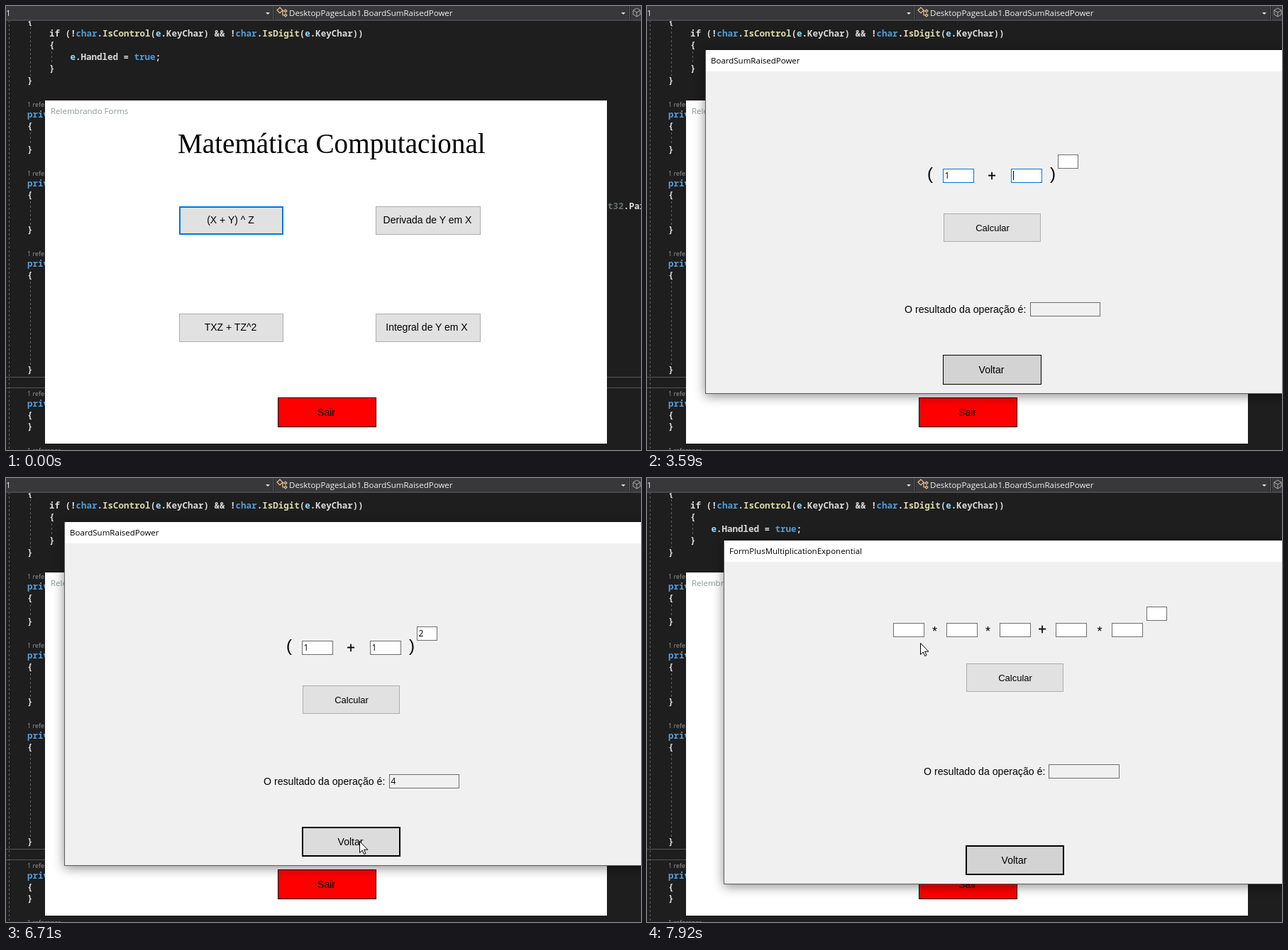
An HTML page that plays this animation: 895 by 625 pixels, repeating every 7990 ms.

```html
<!DOCTYPE html>
<html lang="pt">
<head>
<meta charset="utf-8">
<title>Matemática Computacional</title>
<style>
html, body { margin: 0; width: 100%; height: 100%; overflow: hidden; background: #1e1e1e; }
svg { display: block; width: 895px; height: 625px; }
text { white-space: pre; }
.ui, .value { font-family: "Open Sans", "Noto Sans", sans-serif; font-size: 11.5px; }
.value { font-size: 12px; }
.code { font: 600 12.5px "Noto Sans Mono", "DejaVu Sans Mono", monospace; fill: #dcdcdc; }
.lens { font: 9px "Open Sans", sans-serif; fill: #999; }
.arial { font-family: "Liberation Sans", Arial, sans-serif; }
.head { font: 39.15px "Liberation Serif", "Times New Roman", serif; }
.shadow { filter: drop-shadow(0 3px 8px rgba(0, 0, 0, .45)); }
</style>
</head>
<body>
<svg viewBox="0 0 895 625"><g id="editor"></g><g id="stage"></g></svg>
<script>
const LOOP = 7990;
const $ = id => document.getElementById(id);

// ---------- drawing helpers ----------
const rect = (x, y, w, h, fill, stroke = 'none', sw = 1, cls = '') => {
  const d = stroke === 'none' ? 0 : sw;
  return `<rect x="${x + d / 2}" y="${y + d / 2}" width="${w - d}" height="${h - d}" fill="${fill}" stroke="${stroke}" stroke-width="${sw}" class="${cls}"/>`;
};
const path = (d, fill, stroke = 'none', extra = '') =>
  `<path d="${d}" fill="${fill}" stroke="${stroke}" ${extra}/>`;
const text = (x, y, s, cls = 'ui', fill = '#000') =>
  `<text x="${x}" y="${y}" class="${cls}" fill="${fill}">${s}</text>`;
const arial = (x, y, s, size = 14, extra = 'text-anchor="middle"') =>
  `<text x="${x}" y="${y}" class="arial" font-size="${size}" ${extra}>${s}</text>`;

// ---------- code editor behind the windows ----------
const tint = { char: '#569cd6', true: '#569cd6', private: '#569cd6', e: '#9cdcfe', t32: '#6c706c',
  IsControl: '#dcdcaa', IsDigit: '#dcdcaa' };
const code = (x, y, s) => text(x, y, s.replace(/\w+/g, w =>
  tint[w] ? `<tspan fill="${tint[w]}">${w}</tspan>` : w), 'code', '#dcdcdc');

function editor() {
  let s = rect(0, 0, 895, 625, '#1e1e1e');
  s += code(30, 26, '{') +
    code(61, 43, 'if (!char.IsControl(e.KeyChar) &amp;&amp; !char.IsDigit(e.KeyChar))') +
    code(61, 59, '{') + code(90.5, 76, 'e.Handled = true;') + code(61, 92, '}') +
    code(30, 109, '}') + code(848, 286, 't32.Parse(');
  for (const [y, end] of [[142, 206], [239, 319], [352, 516], [549, 596]])
    s += text(30, y, '1 reference', 'lens') + code(30, y + 14.5, 'private') +
      code(30, y + 30.5, '{') + code(30, end, '}');
  s += text(30, 629, '1 reference', 'lens');
  s += path('M4.5 20V625M34.5 30V98M64.5 64V82M34.5 178V195M34.5 275V308M34.5 388V505',
    'none', '#626262', 'stroke-dasharray="3 3"');
  s += path('M0 522.5H895M0 537.5H895', 'none', '#555');
  s += rect(0, 0, 895, 20, '#38383b') + rect(0, 19, 895, 2, '#48484c');
  for (const x of [375, 877])
    s += rect(x, 0, 3, 20, '#222224') + rect(x + 1, 0, 1, 20, '#6a6a6a');
  s += path('M366 9h6l-3 3zM867 9h6l-3 3z', '#ddd');
  s += text(0, 13.5, '1', 'ui', '#f1f1f1') +
    text(399, 13.5, 'DesktopPagesLab1.BoardSumRaisedPower', 'ui', '#f1f1f1');
  s += path('M382 6l4-4 4 4-4 4zM388 7h4M390 7v6h3M392 7l2-2 2 2-2 2zM392 13l2-2 2 2-2 2z', 'none', '#e8c48c', 'stroke-width="1.2"');
  s += path('M884 6l5-3 5 3v6l-5 3-5-3zl5 3 5-3M889 9v6', 'none', '#aaa');
  return s;
}

// ---------- timeline ----------
const clicks = { open: 770, x: 1640, y: 3520, z: 4330, calc: 5010, back: 6710, second: 7370 };
const shown = { first: 840, closing: 6770, second: 7500 };
const typed = { x: 2800, y: 3800, z: 4480, result: 5150 };
const hidden = [[2800, 2880], [3560, 3850], [4480, 4540]];
const route = [[170, 330, 645], [700, 349, 301], [1040, 349, 301], [1400, 435, 246], [1700, 437, 243],
  [2860, 437, 243], [3420, 534, 247], [3850, 534, 247], [4250, 592, 219], [4540, 592, 219],
  [4800, 520, 312], [5200, 520, 312], [5630, 626, 370], [5700, 626, 426], [5770, 612, 462],
  [6150, 520, 530], [6500, 498, 511], [6930, 498, 511], [7170, 350, 452], [7560, 350, 452], [7880, 385, 232]];

function pointerAt(t) {
  const i = route.findIndex(k => k[0] > t);
  if (i < 0) return route[route.length - 1].slice(1);
  if (i === 0) return route[0].slice(1);
  const [a, b] = [route[i - 1], route[i]];
  const p = (t - a[0]) / (b[0] - a[0]), e = p * p * (3 - 2 * p);
  return [a[1] + (b[1] - a[1]) * e, a[2] + (b[2] - a[2]) * e];
}

function pointer([x, y], beam) {
  const at = `transform="translate(${Math.round(x)} ${Math.round(y)})"`;
  return beam
    ? path('M-3 -7.5h2.5l1 1 1-1h2.5M.5 -7V8M-3 8.5h2.5l1-1 1 1h2.5', 'none', '#000', at)
    : path('M.5 .5V16.5L4.2 13L6.7 18.6L9 17.6L6.6 12.2H11.8Z', '#fff', '#000', at);
}

// ---------- controls ----------
const within = ([px, py], [x, y, w, h]) => px >= x && py >= y && px < x + w && py < y + h;

function button(b, label, size, { focus, hover, press } = {}, dx = 0, base = 25) {
  const fill = press ? '#cce4f7' : hover ? '#e5f1fb' : '#e1e1e1';
  const line = press ? '#005499' : focus || hover ? '#0078d7' : '#adadad';
  return rect(...b, fill, line, focus && !press ? 2 : 1) +
    arial(b[0] + b[2] / 2 + dx, b[1] + base, label, size);
}
const flat = (b, label, fill, sw = 1) =>
  rect(...b, fill, '#000', sw) + arial(b[0] + b[2] / 2 - 1, b[1] + 26, label);
const GREY = '#6e6e6e';
const field = (b, line = GREY, value = '', fill = '#fff') =>
  rect(...b, fill, line) + text(b[0] + 2.5, b[1] + 14, value, 'value');
const label = (x, y) => arial(x, y, 'O resultado da operação é:', 14.15, '');
const plus = (x, y) => arial(x, y, '+', 20, 'text-anchor="middle" stroke="#000" stroke-width=".4"');

function frame(x, y, title, body, { scale, alpha }) {
  const cx = x + 411, cy = y + 242;
  return `<g opacity="${alpha}" transform="translate(${cx} ${cy}) scale(${scale}) translate(${-cx} ${-cy})">` +
    rect(x, y, 822, 484, '#f0f0f0', '#5c5c5c', 1, 'shadow') +
    rect(x + 1, y, 820, 30, '#fff') + text(x + 8, y + 19, title) + body + '</g>';
}
const opening = age => {
  const p = Math.min(1, age / 250);
  return { scale: 1 - .056 * (1 - p) ** 3, alpha: Math.min(1, 2 * p) };
};
const closing = age => {
  const p = Math.min(1, age / 155);
  return { scale: 1 - .043 * p, alpha: 1 - p };
};

// ---------- windows ----------
function mainWindow(t, at) {
  const active = (t >= clicks.open && t < shown.first) || (t >= shown.closing && t < shown.second);
  const live = t < shown.first || active;
  const second = t >= clicks.second;
  const choice = (b, name, dx, focus, click) => button(b, name, 14, {
    focus, hover: live && within(at, b), press: live && t >= click && t < click + 70
  }, dx, 24);
  return rect(55, 133, 792, 483, '#fff', 'none', 1, active ? 'shadow' : '') +
    text(63, 151.5, 'Relembrando Forms', 'ui', active ? '#000' : '#8d9b92') +
    text(242, 207, 'Matemática Computacional', 'head') +
    choice([244, 282, 147, 40], '(X + Y) ^ Z', -1, !second, clicks.open) +
    choice([521, 282, 148, 40], 'Derivada de Y em X', -1) +
    choice([244, 433, 147, 40], 'TXZ + TZ^2', -1, second, clicks.second) +
    choice([521, 433, 148, 40], 'Integral de Y em X', -2) +
    flat([383, 551, 139, 42], 'Sair', '#f00');
}

const fields = { x: [417, 229, 44, 20], y: [513, 229, 44, 20], z: [579, 209, 29, 20] };
const result = [540, 417, 99, 20];
const calc = [418, 292, 137, 40], back = [417, 491, 139, 42];

function sumWindow(t, at) {
  const order = ['x', 'y', 'z', 'calc', 'back'];
  const focus = order.filter(k => t >= clicks[k]).pop() || 'back';
  const settled = t >= shown.first + 200 && t < shown.closing;
  const hover = b => settled && within(at, b);
  let s = arial(395, 244, '(', 24, '') + arial(568, 244, ')', 24, '') + plus(486, 246);
  for (const k of ['x', 'y', 'z']) {
    const b = fields[k], has = t >= typed[k];
    const next = clicks[order[order.indexOf(k) + 1]];
    const lit = t >= clicks[k] && t < next + 90;
    s += field(b, lit ? '#0078d7' : hover(b) ? '#171717' : GREY, has ? (k === 'z' ? 2 : 1) : '');
    const since = t - (has ? typed[k] : clicks[k]);
    if (focus === k && Math.floor(since / 530) % 2 === 0)
      s += rect(b[0] + (has ? 10 : 3), b[1] + 3, 1, 13, '#000');
  }
  s += button(calc, 'Calcular', 13, {
    focus: focus === 'calc', hover: hover(calc), press: t >= clicks.calc && t < clicks.calc + 140 }, .5);
  s += label(363, 432) +
    field(result, hover(result) ? '#171717' : GREY, t >= typed.result ? 4 : '', '#f0f0f0');
  s += flat(back, 'Voltar', hover(back) ? '#dcdcdc' : '#d3d3d3', focus === 'back' ? 2 : 1);
  const pose = t < shown.closing ? opening(t - shown.first) : closing(t - shown.closing);
  return frame(82, 62, 'BoardSumRaisedPower', s, pose);
}

function productWindow(t) {
  let s = field([704, 181, 29, 20]);
  for (const x of [347, 422, 497, 576, 655]) s += field([x, 204, 44, 20]);
  for (const x of [405.5, 480.5, 638]) s += arial(x, 222, '*', 18);
  s += plus(557, 220) + button([450, 261, 137, 40], 'Calcular', 13, {}, .5) +
    label(390, 418) + field([566, 403, 100, 20], GREY, '', '#f0f0f0') +
    flat([449, 517, 139, 42], 'Voltar', '#d3d3d3', 2);
  return frame(108, 88, 'FormPlusMultiplicationExponential', s, opening(t - shown.second));
}

function draw(t) {
  const at = pointerAt(t);
  const sumOpen = t >= shown.first && t < shown.closing + 155;
  let s = mainWindow(t, at);
  if (sumOpen) s += sumWindow(t, at);
  if (t >= shown.second) s += productWindow(t);
  const inForm = t >= shown.first + 200 && t < shown.closing;
  const beam = inForm && [...Object.values(fields), result].some(b => within(at, b));
  if (!hidden.some(([a, b]) => t >= a && t < b)) s += pointer(at, beam);
  $('stage').innerHTML = s;
}

$('editor').innerHTML = editor();
const start = performance.now();
function tick() {
  draw((performance.now() - start) % LOOP);
  requestAnimationFrame(tick);
}
tick();
</script>
</body>
</html>
```
